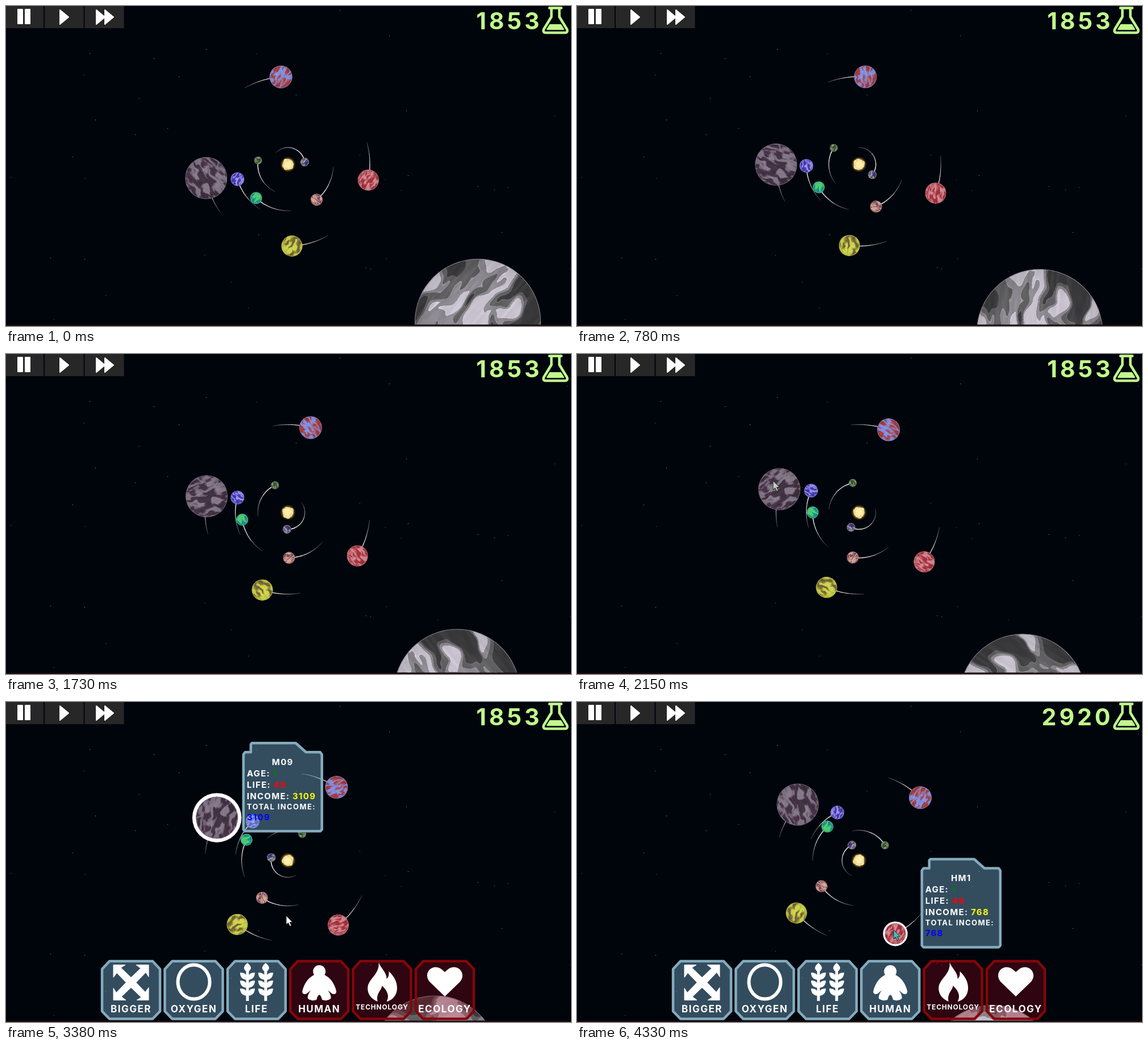
Animation of 994 by 563 pixels, one loop 4.37 s. Source, as an HTML page with a canvas:

```html
<!DOCTYPE html>
<html lang="en">
<head>
<meta charset="utf-8">
<title>Orbits</title>
<style>
html, body { margin: 0; width: 100%; height: 100%; overflow: hidden; background: #00050c; }
canvas, svg { position: absolute; left: 0; top: 0; width: 994px; height: 563px; }
text { font-family: Inter, "DejaVu Sans", sans-serif; font-weight: 700; fill: #fff; }
.line { font-size: 15px; letter-spacing: 1.3px; }
.small { font-size: 13px; letter-spacing: 1.4px; }
.label { font-size: 17px; letter-spacing: 1.5px; text-anchor: middle; }
.frame { fill: rgb(140 200 235 / .37); stroke: #84abbe; stroke-width: 4.5; stroke-linejoin: round; }
.locked .frame { fill: rgb(153 7 27 / .3); stroke: #84060a; }
</style>
</head>
<body>
<canvas id="space" width="994" height="563"></canvas>
<svg viewBox="0 0 994 563">
  <g fill="#272727">
    <path d="M0 0H66V39H0ZM68 0H136.500V39H68ZM138.500 0H207.500V39H138.500Z"/>
  </g>
  <g fill="#fff" stroke="#fff" stroke-width="2" stroke-linejoin="round">
    <path d="M21 6H29V31H21ZM34 6H42V31H34Z"/>
    <path d="M95 7L110 19.500L95 32Z"/>
    <path d="M159 7L174 19.500L159 32ZM174 7L189 19.500L174 32Z"/>
  </g>
  <text id="score" x="943.500" y="40.500" text-anchor="end" style="font-size:41px;letter-spacing:5px;fill:#c0fa8c"></text>
  <g fill="none" stroke="#c0fa8c" stroke-width="4.500" stroke-linejoin="round" stroke-linecap="round">
    <path d="M956 3.500H977M959.500 4V19L946 41Q944 47 950 47H983Q989 47 987 41L973.500 19V4"/>
    <path d="M957 33H976L981 41H952Z" fill="#c0fa8c" stroke-width="2"/>
  </g>
  <g id="menu"></g>
  <g id="info">
    <path class="frame" d="M3 23L6 19H16V5L18 3H95L113 19H138L141 23V155L138 158H6L3 155Z"/>
    <text id="name" class="line" x="72" y="42" text-anchor="middle"></text>
    <text class="line" x="9" y="62">AGE: <tspan fill="#008000">1</tspan></text>
    <text class="line" x="9" y="82">LIFE: <tspan fill="#f00">49</tspan></text>
    <text class="line" x="9" y="102">INCOME: <tspan id="income" fill="#ff0"></tspan></text>
    <text class="small" x="9" y="120">TOTAL INCOME:</text>
    <text id="total" class="line" x="9" y="139" style="fill:#00f"></text>
  </g>
  <path id="cursor" d="M0 0V15.500L3.500 12.500L6.500 18.500L9 17.300L6.300 11.500H11Z" stroke="#111" stroke-width=".8"/>
  <rect y="560.500" width="994" height="2.500" fill="#1d0b0f"/>
</svg>
<script>
const LOOP = 4370, SUN = { x: 496, y: 278.7 }, RAD = Math.PI / 180;
const TRAIL_SECONDS = 2.2;
const SELECT_FIRST = 2200, SELECT_SECOND = 4100, PAYDAY = 4000;
const $ = id => document.getElementById(id);
const ctx = $('space').getContext('2d');

// start and speed: orbit in degrees; tilt and spin: direction of the surface streaks
const planet = (orbit, start, speed, r, tilt, spin, colors, detail = 7) =>
  ({ orbit, start, speed, r, tilt, spin, colors, detail });
const purple = planet(145.8, 170.5, 11.98, 37, -50, 38, ['#3f3340', '#503651', '#716574', '#85798a'], 9);
const red = planet(144.1, 11, 12.15, 18.5, 55, 42, ['#a5303c', '#b8505a', '#c46c76', '#cf8a92'], 8);
const moon = planet(434, 39.67, 4.08, 111, 50, 45, ['#3f3f41', '#626164', '#8d8a91', '#cbc5d1'], 5.6);
const planets = [
  planet(29.7, -8, 58.5, 7.5, 40, 45, ['#3a3470', '#6558b0', '#8d8a62', '#9c98b8'], 5),
  planet(53, 187.6, 32.8, 7, 20, 45, ['#2c4a2c', '#3f7d3d', '#6c7060', '#8a9a78'], 5),
  planet(92.5, 163.7, 18.94, 12, 60, 45, ['#4038a0', '#584bc4', '#796ee0', '#a29ae8']),
  planet(81.4, 133.5, 21.6, 10.5, 45, 45, ['#2088a0', '#22a055', '#30b898', '#52cc70'], 5),
  planet(80, 50.8, 21.85, 10.5, 130, 45, ['#60466a', '#95605f', '#b98078', '#d8a898'], 7),
  red,
  planet(143.7, 87.2, 12.17, 18.5, 60, 45, ['#77603c', '#8f8a3e', '#b4bc3a', '#cdd450'], 5),
  planet(154.5, 265.4, 11.3, 20, 58, 42, ['#a63c3c', '#b04c48', '#8a74ac', '#8492e6'], 8),
  purple,
  moon
];

const hash = (x, y) => {
  const v = Math.sin(x * 127.1 + y * 311.7) * 43758.5453;
  return v - Math.floor(v);
};
const mix = (a, b, k) => a + (b - a) * k;
const smooth = k => k * k * (3 - 2 * k);

function noise(x, y) {
  const i = Math.floor(x), j = Math.floor(y), u = smooth(x - i), v = smooth(y - j);
  return mix(mix(hash(i, j), hash(i + 1, j), u), mix(hash(i, j + 1), hash(i + 1, j + 1), u), v);
}

function makeSurface({ r, colors, detail }, seed) {
  const size = Math.ceil(r * 4), canvas = document.createElement('canvas');
  canvas.width = canvas.height = size;
  const c = canvas.getContext('2d'), image = c.createImageData(size, size);
  const rgb = colors.map(h => [1, 3, 5].map(i => parseInt(h.slice(i, i + 2), 16)));
  for (let p = 0; p < size * size; p++) {
    const u = (p % size) / size * 2 - 1, v = Math.floor(p / size) / size * 2 - 1;
    const bend = noise(u * 4 + seed, v * 4) * 0.2;
    const x = (u + bend) * detail + seed * 17, y = v * detail * 0.36 + seed * 5;
    const n = noise(x, y) * 0.8 + noise(x * 2.1 + 9, y * 2.1) * 0.2;
    const level = Math.min(3.99, Math.max(0, ((n - 0.5) * 2.3 + 0.5) * 4));
    const edge = r > 100 && level > 1 && level % 1 < 0.09 ? 18 : 0;
    const grain = (noise(u * 24, v * 5) - 0.5) * 16;
    rgb[Math.floor(level)].forEach((value, k) => image.data[p * 4 + k] = value + edge + grain);
    image.data[p * 4 + 3] = 255;
  }
  c.putImageData(image, 0, 0);
  return canvas;
}
planets.forEach((p, i) => p.surface = makeSurface(p, i + 3));

const angleAt = (p, s) => (p.start + p.speed * s) * RAD;
const place = (p, s) => ({
  x: SUN.x + p.orbit * Math.cos(angleAt(p, s)),
  y: SUN.y + p.orbit * Math.sin(angleAt(p, s))
});

const stars = [
  674, 52, 587, 7, 147, 83, 157, 200, 704, 184, 227, 226, 8, 301, 139, 303, 667, 305, 707, 298,
  830, 317, 859, 323, 883, 319, 872, 398, 695, 324, 175, 509, 84, 551, 78, 443, 138, 445, 349, 438,
  396, 485, 426, 531, 633, 460, 641, 462, 669, 444, 759, 467, 987, 56, 352, 76, 440, 84, 234, 162,
  510, 156, 622, 262, 284, 215, 117, 265, 993, 462, 304, 124, 260, 92, 965, 193, 137, 121, 444, 402
];

function disc(x, y, r, fill) {
  ctx.beginPath();
  ctx.arc(x, y, r, 0, 7);
  ctx.fillStyle = fill;
  ctx.fill();
}

function drawStars() {
  for (let i = 0; i < stars.length; i += 2) {
    ctx.fillStyle = `rgb(190 175 185 / ${0.45 + 0.5 * hash(i, 1)})`;
    ctx.fillRect(stars[i], stars[i + 1], 1, 1);
  }
}

function drawTrail(p, s) {
  const steps = 28, span = p.speed * TRAIL_SECONDS * RAD, head = angleAt(p, s);
  for (let i = 0; i < steps; i++) {
    const k = i / steps;
    ctx.beginPath();
    ctx.arc(SUN.x, SUN.y, p.orbit, head - span * (i + 1) / steps, head - span * k);
    ctx.lineWidth = mix(1.7, 0.5, k);
    ctx.strokeStyle = `rgb(255 255 255 / ${1 - k * k * 0.6})`;
    ctx.stroke();
  }
}

function drawSun(s) {
  const glow = ctx.createRadialGradient(SUN.x, SUN.y, 7, SUN.x, SUN.y, 14);
  glow.addColorStop(0, '#ecc860');
  glow.addColorStop(0.4, 'rgb(190 145 60 / .65)');
  glow.addColorStop(1, 'rgb(110 70 10 / 0)');
  disc(SUN.x, SUN.y, 14, glow);
  for (let i = 0; i < 9; i++) {
    const a = i * 40 * RAD + s * 1.3, d = 6 + Math.sin(s * 5 + i * 2.3);
    disc(SUN.x + d * Math.cos(a), SUN.y + d * Math.sin(a), 4, i % 2 ? '#f5d880' : '#f8e29c');
  }
  disc(SUN.x + Math.sin(s * 3), SUN.y + Math.cos(s * 2), 6, '#fdeeb4');
}

function drawPlanet(p, s, selected) {
  const { x, y } = place(p, s), { r } = p;
  ctx.save();
  ctx.translate(x, y);
  if (selected) disc(0, 0, r * 1.17, '#fff');
  ctx.beginPath();
  ctx.arc(0, 0, r, 0, 7);
  ctx.clip();
  ctx.rotate((90 - p.tilt - p.spin * s) * RAD);
  ctx.drawImage(p.surface, -r, -r, r * 2, r * 2);
  const shade = ctx.createRadialGradient(0, 0, r * 0.6, 0, 0, r);
  shade.addColorStop(0, 'rgb(0 0 0 / 0)');
  shade.addColorStop(1, 'rgb(0 0 0 / .1)');
  disc(0, 0, r, shade);
  ctx.beginPath();
  ctx.arc(0, 0, r - 0.5, 0, 7);
  ctx.lineWidth = 1;
  ctx.strokeStyle = p.colors[2];
  ctx.stroke();
  ctx.restore();
}

const stalk = x => `<g transform="translate(${x} 0)"><path d="M-2.500 470H2.500V526H-2.500ZM0 459Q7 465 6 469Q4 474 0 475Q-4 474-6 469Q-7 465 0 459Z"/>` +
  [476, 490, 504].map(y => [1, -1].map(side =>
    `<path transform="translate(0 ${y}) scale(${side} 1)" d="M1 13Q13 12 13 0Q2 0 1 8Z"/>`).join('')).join('') + '</g>';
const arrow = [0, 90, 180, 270].map(a =>
  `<path transform="translate(0 493.500) rotate(${a})" d="M-4 5L18 26L10 31H31V9L25 17L4-5Z" stroke="#fff" stroke-width="1" stroke-linejoin="round"/>`).join('');
const person = '<circle cy="474" r="11"/><path d="M-9 480H9Q25 488 30 509Q30 516 22 513L15 507Q22 517 20 522Q14 527 5 524Q3 516 0 515Q-3 516-5 524Q-14 527-20 522Q-22 517-15 507L-22 513Q-30 516-30 509Q-25 488-9 480Z"/>';
const flame = '<path d="M-6 458C-2 469 8 475 8 487C12 484 12 480 12 474C23 484 28 496 26 508C24 520 14 526 8 527C14 516 8 507 0 499C-1 508-11 512-8 527C-20 522-27 512-25 500C-22 486-4 478-6 458Z"/>';
const heart = '<path d="M0 518L-27 492C-39 477-22 459-6 470L0 475L6 470C22 459 39 477 27 492Z"/>';
const ring = '<ellipse cy="492.500" rx="28" ry="30" fill="none" stroke="#fff" stroke-width="6"/>';

$('menu').innerHTML = [
  ['BIGGER', arrow], ['OXYGEN', ring], ['LIFE', stalk(-16) + stalk(16)],
  ['HUMAN', person], ['TECHNOLOGY', flame], ['ECOLOGY', heart]
].map(([label, icon], i) => `<g id="${label}" class="${i > 2 ? 'locked' : ''}" transform="translate(${220 + i * 110.4} 0)">
  <path class="frame" d="M-38 456H38L51 470V544L38 557.500H-38L-51 544V470Z"/>
  <g fill="#fff">${icon}</g>
  <text class="label" y="${label.length > 8 ? 541 : 546}" ${label.length > 8 ? 'style="font-size:12px;letter-spacing:.800px"' : ''}>${label}</text></g>`).join('');

// time, x, y
const cursorPath = [
  [1850, 470, 320], [2080, 345, 223], [2230, 345, 223], [2560, 192, 178],
  [2800, 192, 178], [3340, 493, 376], [3480, 493, 376], [4000, 557, 401], [LOOP, 557, 401]
];

function drawCursor(t) {
  const next = cursorPath.findIndex(k => k[0] > t), cursor = $('cursor');
  cursor.style.display = next > 0 ? '' : 'none';
  if (next < 1) return;
  const a = cursorPath[next - 1], b = cursorPath[next], k = smooth((t - a[0]) / (b[0] - a[0]));
  cursor.setAttribute('transform', `translate(${mix(a[1], b[1], k)} ${mix(a[2], b[2], k)})`);
  const overPurple = t > 2040 && t < 2290;
  cursor.setAttribute('fill', t > 3960 ? '#38c4c4' : overPurple ? '#b9d2bf' : '#fff');
}

function drawInterface(t, s, selected) {
  const paid = t >= PAYDAY;
  $('score').textContent = paid ? 2920 : 1853;
  $('HUMAN').setAttribute('class', paid ? '' : 'locked');
  $('menu').style.display = $('info').style.display = selected ? '' : 'none';
  if (selected) {
    const { x, y } = place(selected, s), income = selected === red ? 768 : 3109;
    $('info').setAttribute('transform', `translate(${x + 43.7} ${y - 134.3})`);
    $('name').textContent = selected === red ? 'HM1' : 'M09';
    $('income').textContent = $('total').textContent = income;
  }
  drawCursor(t);
}

function render(t) {
  const s = t / 1000;
  const selected = t >= SELECT_SECOND ? red : t >= SELECT_FIRST ? purple : null;
  ctx.fillStyle = '#00050c';
  ctx.fillRect(0, 0, 994, 563);
  drawStars();
  planets.forEach(p => drawTrail(p, s));
  drawSun(s);
  planets.forEach(p => drawPlanet(p, s, p === selected));
  drawInterface(t, s, selected);
}

const begin = performance.now();
function tick() {
  render((performance.now() - begin) % LOOP);
  requestAnimationFrame(tick);
}
tick();
</script>
</body>
</html>
```
